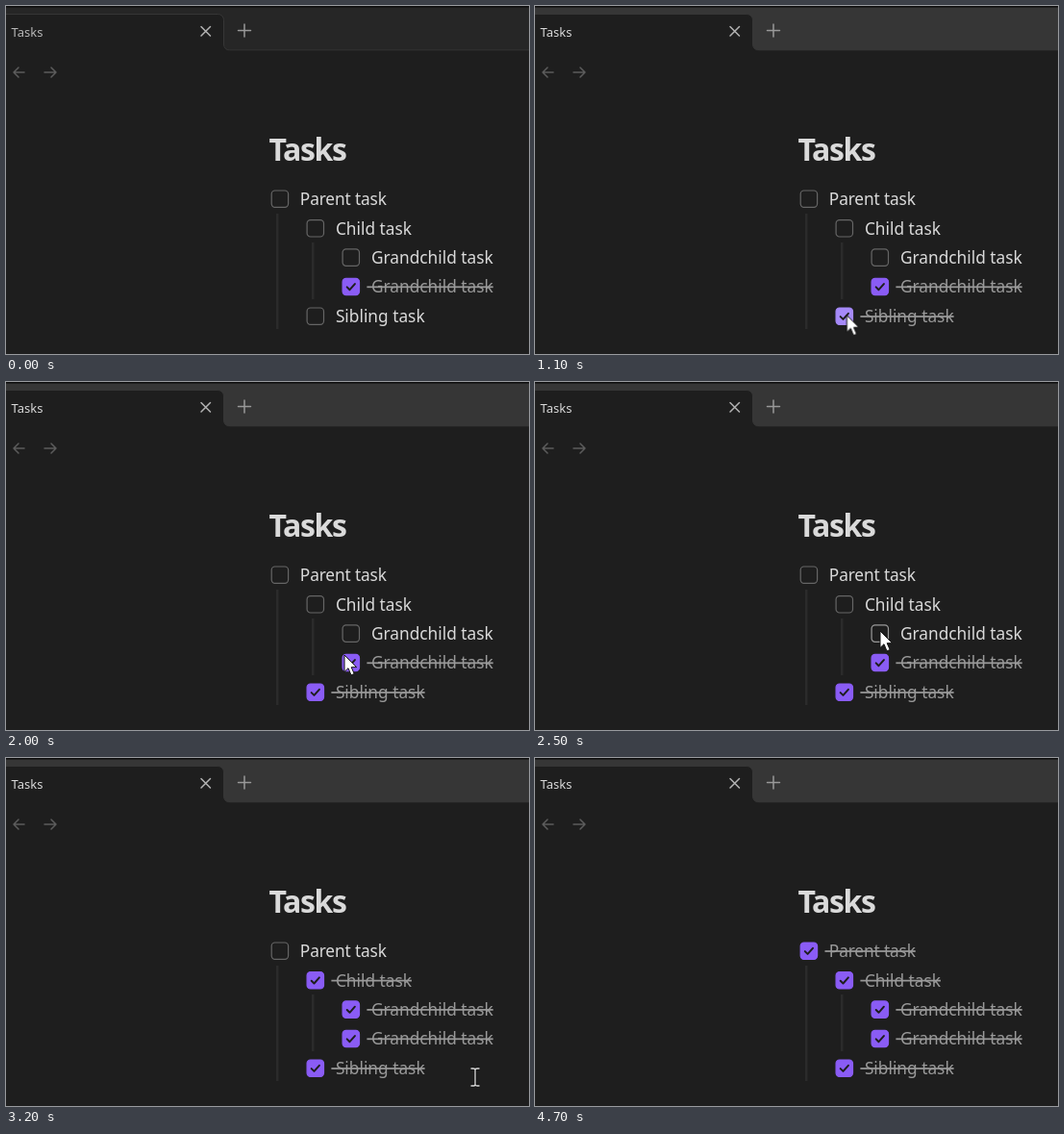
These frames come from a looping animation (544x362 px, 4.8 s). An HTML page:

```html
<!DOCTYPE html>
<html lang="en">
<head>
<meta charset="utf-8">
<title>Tasks</title>
<style>
html, body { margin: 0; width: 100%; height: 100%; overflow: hidden; background: #1e1e1e; }
svg { display: block; width: 544px; height: 362px; }
text { font-family: "Noto Sans", "Open Sans", sans-serif; }
.icon { fill: none; stroke-width: 1.5; stroke-linecap: round; stroke-linejoin: round; }

/* Window focus */
.bar { fill: #262626; animation: focus-bar 4.8s step-end infinite; }
.tab { fill: #1e1e1e; stroke: #363636; }
.title { font-size: 13px; fill: #b8b8b8; animation: focus-title 4.8s step-end infinite; }
@keyframes focus-bar { 18.74%, 99.99% { fill: #363636; } }
@keyframes focus-title { 18.74%, 99.99% { fill: #dadada; } }

/* Task rows: the box inherits its look from the row */
.heading { font-size: 32px; font-weight: 700; letter-spacing: -1.4px; fill: #dadada; }
.guide { fill: #2b2b2b; }
.row { --fill: #1e1e1e; --edge: #666; --ink: #dadada; --mark: 0; --strike: none; }
.row.done { --fill: #8a5cf5; --edge: #8a5cf5; --ink: #999; --mark: 1; --strike: line-through; }
.row text { font-size: 17.3px; fill: var(--ink); text-decoration: var(--strike); }
#box rect { fill: var(--fill); stroke: var(--edge); stroke-width: 1.2; }
#box path { fill: none; stroke: #1e1e1e; stroke-width: 2; stroke-linecap: round; stroke-linejoin: round; opacity: var(--mark); }

.parent { animation: parent 4.8s step-end infinite; }
.child { animation: child 4.8s step-end infinite; }
.grandchild { animation: grandchild 4.8s step-end infinite; }
.sibling { animation: sibling 4.8s step-end infinite; }
@keyframes parent {
  77.07%, 99.99% { --fill: #8a5cf5; --edge: #8a5cf5; --ink: #999; --mark: 1; --strike: line-through; }
}
@keyframes child {
  64.57%, 99.99% { --fill: #8a5cf5; --edge: #8a5cf5; --ink: #999; --mark: 1; --strike: line-through; }
}
@keyframes grandchild {
  45.82% { --edge: #999; }
  54.15% { --fill: #a68af9; --edge: #a68af9; --ink: #999; --mark: 1; --strike: line-through; }
  58.32%, 99.99% { --fill: #8a5cf5; --edge: #8a5cf5; --ink: #999; --mark: 1; --strike: line-through; }
}
@keyframes sibling {
  16.65% { --edge: #999; }
  18.74% { --fill: #a68af9; --edge: #a68af9; --ink: #999; --mark: 1; --strike: line-through; }
  35.4%, 99.99% { --fill: #8a5cf5; --edge: #8a5cf5; --ink: #999; --mark: 1; --strike: line-through; }
}

/* Pointer, advancing every 100 ms */
.pointer { animation: move 4.8s infinite; }
.beam { opacity: 0; fill: none; animation: beam 4.8s step-end infinite; }
.arrow { opacity: 0; fill: #fff; stroke: #111; animation: arrow 4.8s step-end infinite; }
@keyframes move {
  0% { transform: translate(495px, 331px); animation-timing-function: step-end; }
  2.07% { transform: translate(495px, 331px); animation-timing-function: steps(2); }
  6.24% { transform: translate(440px, 327px); animation-timing-function: steps(3); }
  12.49% { transform: translate(345px, 318px); animation-timing-function: step-end; }
  14.57% { transform: translate(343px, 318px); animation-timing-function: step-end; }
  16.65% { transform: translate(334px, 321px); animation-timing-function: step-end; }
  18.74% { transform: translate(323px, 321px); animation-timing-function: steps(3); }
  24.99% { transform: translate(325px, 322px); animation-timing-function: steps(3); }
  31.24% { transform: translate(334px, 323px); animation-timing-function: steps(3); }
  37.49% { transform: translate(345px, 308px); animation-timing-function: steps(4); }
  45.82% { transform: translate(359px, 260px); animation-timing-function: steps(3); }
  52.07% { transform: translate(359px, 259px); animation-timing-function: steps(2); }
  56.24% { transform: translate(362px, 262px); animation-timing-function: steps(3); }
  62.49% { transform: translate(455px, 312px); animation-timing-function: steps(2); }
  66.65% { transform: translate(488px, 332px); animation-timing-function: steps(2); }
  70.82%, 100% { transform: translate(490px, 352px); animation-timing-function: step-end; }
}
@keyframes beam {
  0%, 16.65%, 72.9%, 100% { opacity: 0; }
  2.07%, 58.32% { opacity: 1; }
}
@keyframes arrow {
  0%, 58.32%, 100% { opacity: 0; }
  16.65% { opacity: 1; }
}
</style>
</head>
<body>
<svg viewBox="0 0 544 362">
  <defs>
    <g id="box">
      <rect x=".6" y="-8.6" width="17.4" height="17.4" rx="3.6"/>
      <path d="M5.2 .5 8 3.3 13.4-2.8"/>
    </g>
    <path id="ibeam" d="M-4.5-9H-2Q0-9 0-7.5Q0-9 2-9H4.5M0-7.5V7.5M-4.5 9H-2Q0 9 0 7.5Q0 9 2 9H4.5"/>
  </defs>

  <rect width="544" height="362" fill="#1e1e1e"/>
  <rect class="bar" y="1" width="544" height="46"/>
  <rect width="544" height="1.5" fill="#0c0c0c"/>
  <path class="tab" d="M-2 8.5H220.5a6 6 0 0 1 6 6V40a6 6 0 0 0 6 6H546V50H-2z"/>
  <rect y="46.5" width="544" height="5" fill="#1e1e1e"/>
  <text class="title" x="5.5" y="31.5">Tasks</text>
  <path class="icon" stroke="#b3b3b3" d="m203 21.5 9.5 9.5m0-9.5-9.5 9.5"/>
  <path class="icon" stroke="#999" d="M241.5 25.5h13M248 19v13"/>
  <path class="icon" stroke="#5c5c5c" d="M19 69H8m5-5-5 5 5 5M40 69h12m-5-5 5 5-5 5"/>

  <text class="heading" x="273.5" y="161">Tasks</text>
  <rect class="guide" x="281" y="216" width="2.5" height="120"/>
  <rect class="guide" x="318" y="246" width="2.5" height="59"/>

  <g class="row parent" transform="translate(275.6 200.6)">
    <use href="#box"/><text x="25.9" y="6.4" letter-spacing="-.15">&#160;Parent task</text>
  </g>
  <g class="row child" transform="translate(312.5 231.2)">
    <use href="#box"/><text x="25.9" y="6.4">&#160;Child task</text>
  </g>
  <g class="row grandchild" transform="translate(349.5 261.5)">
    <use href="#box"/><text x="25.9" y="6.4">&#160;Grandchild task</text>
  </g>
  <g class="row done" transform="translate(349.5 291.9)">
    <use href="#box"/><text x="25.9" y="6.4">&#160;Grandchild task</text>
  </g>
  <g class="row sibling" transform="translate(312.5 322.6)">
    <use href="#box"/><text x="25.9" y="6.4">&#160;Sibling task</text>
  </g>

  <g class="pointer">
    <g class="beam">
      <use href="#ibeam" stroke="#111" stroke-width="3"/>
      <use href="#ibeam" stroke="#ddd" stroke-width="1.3"/>
    </g>
    <path class="arrow" d="M0 0V17.5l4-3.8 3 7.2 3.2-1.4-3-6.8H12.6z"/>
  </g>
</svg>
</body>
</html>
```
